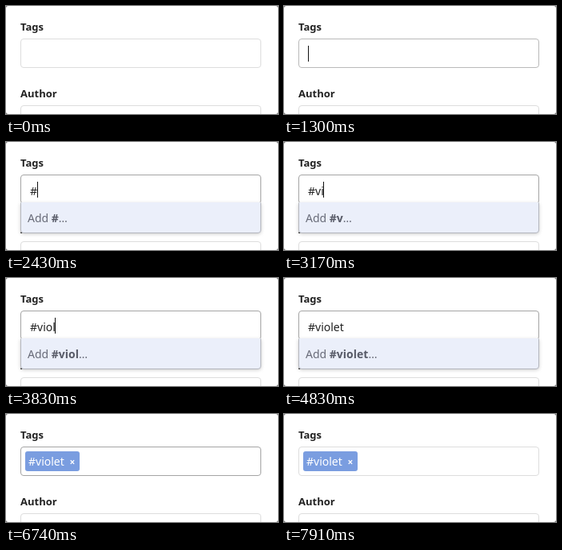
Write an HTML page that moves like this. It is 340x136 px and loops after 8.3 s.

```html
<!DOCTYPE html>
<html lang="en">
<head>
<meta charset="utf-8">
<title>Tag input</title>
<style>
  html, body { margin: 0; width: 100%; height: 100%; overflow: hidden; background: #6e6e6e; }
  svg { display: block; width: 340px; height: 136px; }
  text { font: 14px "Noto Sans", sans-serif; fill: #222; }
  .label { font-size: 13px; font-weight: 600; }
  .box { fill: #fff; stroke: #ddd; }
  .menu text { fill: #686b78; }
  .menu tspan { font-weight: 600; fill: #585b68; }
  .panel { fill: #ebeffa; stroke: #b4b6bd; filter: drop-shadow(0 1px 2px rgba(0, 0, 0, .2)); }
  .tag rect { fill: #7a9de0; }
  .tag text { fill: #fff; }
  .tag .close { font-size: 12px; font-weight: 700; text-anchor: middle; }
</style>
</head>
<body>
<svg viewBox="0 0 340 136">
  <rect width="340" height="136" rx="3" fill="#fff"/>
  <text class="label" x="18" y="31">Tags</text>
  <text class="label" x="18" y="115">Author</text>
  <rect class="box" x="18.5" y="125.5" width="300" height="36" rx="3.5"/>
  <rect class="box" id="field" x="18.5" y="41.5" width="300" height="36" rx="3.5"/>
  <text id="typed" x="30" y="67"></text>
  <g class="menu" id="menu">
    <path class="panel" d="M18.5 76.5V111a3.5 3.5 0 0 0 3.5 3.5H315a3.5 3.5 0 0 0 3.5-3.5V76.5" />
    <rect x="19" y="76" width="299" height="2" fill="#ebeffa"/>
    <text x="27" y="101">Add <tspan id="hint"></tspan>…</text>
  </g>
  <g class="tag" id="tag">
    <rect x="24" y="47" width="68" height="25" rx="3"/>
    <text x="28" y="65">#violet</text>
    <text class="close" x="83" y="65">×</text>
  </g>
  <rect id="caret" width="1" fill="#111"/>
</svg>
<script>
  const LOOP = 8300;
  const WORD = '#violet';
  const FOCUS = 1260, PICK = 5220, BLUR = 7700;

  // When each letter is typed, and when the menu catches up
  const typeTimes = [2350, 2780, 3170, 3430, 3740, 4000, 4350];
  const hintTimes = [2430, 2870, 3260, 3520, 3830, 4040, 4350];
  // The caret toggles at each of these times
  const blinkTimes = [FOCUS, 1740, 2260, 4830, PICK, 5700, 6220, 6740, 7220, BLUR];

  const $ = id => document.getElementById(id);
  const [field, typed, menu, hint, tag, caret] =
    ['field', 'typed', 'menu', 'hint', 'tag', 'caret'].map($);

  const passed = (times, t) => times.filter(x => x <= t).length;
  const ramp = (t, start, length) => Math.min(1, Math.max(0, (t - start) / length));
  const show = (el, on) => el.setAttribute('visibility', on ? 'visible' : 'hidden');

  function render(t) {
    const picked = t >= PICK;
    const text = picked ? '' : WORD.slice(0, passed(typeTimes, t));
    const hinted = picked ? 0 : passed(hintTimes, t);

    const focus = ramp(t, FOCUS - 45, 135) - ramp(t, BLUR - 50, 260);
    const grey = Math.round(221 - 57 * focus);
    field.style.stroke = `rgb(${grey}, ${grey}, ${grey})`;

    typed.textContent = text;
    hint.textContent = WORD.slice(0, hinted);
    show(menu, hinted > 0);
    show(tag, picked);

    const width = text ? typed.getComputedTextLength() : 0;
    caret.setAttribute('x', picked ? 96 : Math.floor(30 + width));
    caret.setAttribute('y', picked ? 48 : 50);
    caret.setAttribute('height', picked ? 23 : 20);
    show(caret, passed(blinkTimes, t) % 2 === 1);
  }

  const start = performance.now();
  function tick() {
    render((performance.now() - start) % LOOP);
    requestAnimationFrame(tick);
  }
  tick();
</script>
</body>
</html>
```
